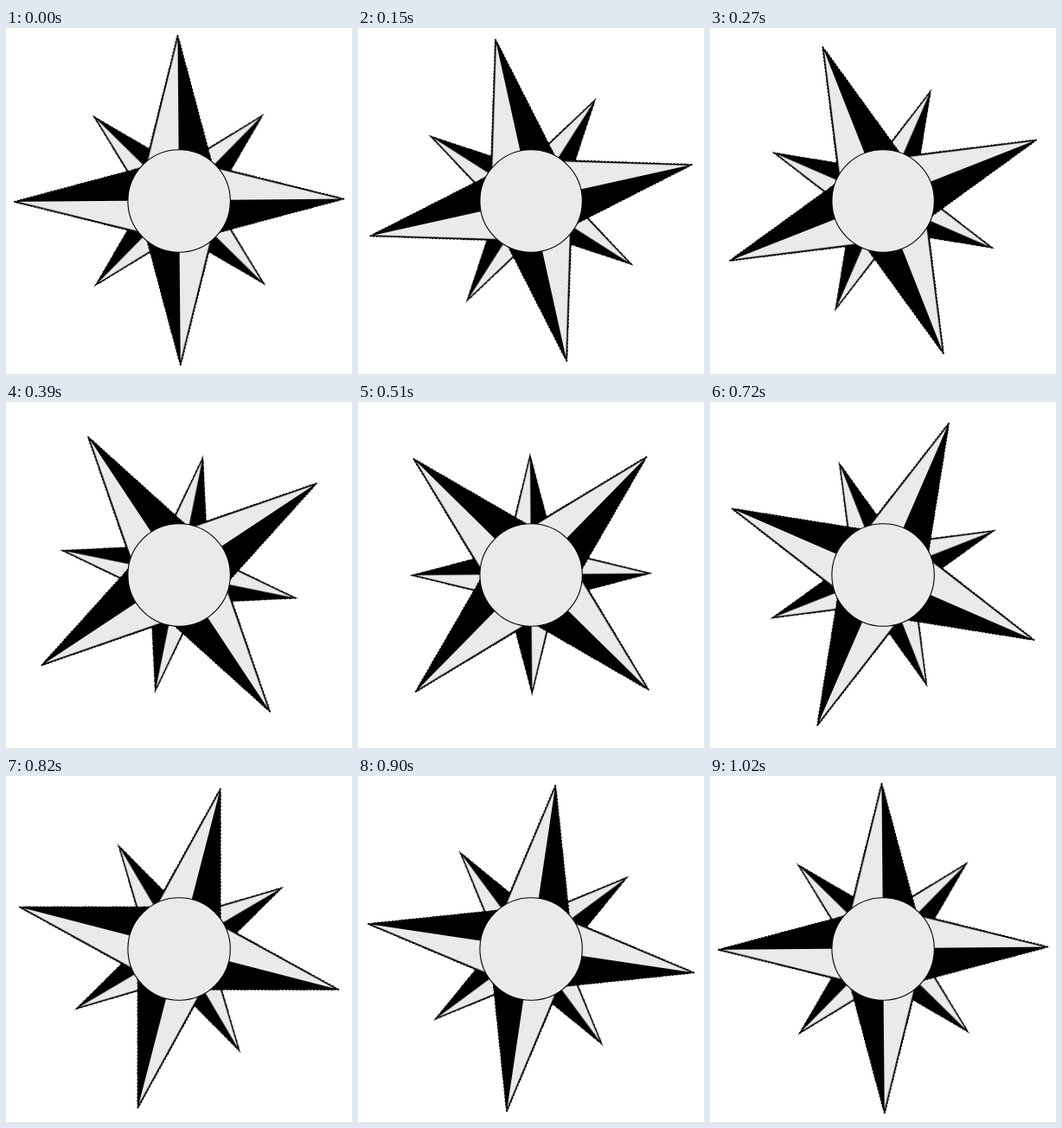
An HTML page that plays this animation: 400x400 px, repeating every 1620 ms.

```html
<!DOCTYPE html>
<html lang="en">
<head>
<meta charset="utf-8">
<title>Turning compass rose</title>
<style>
  html, body { margin: 0; width: 100%; height: 100%; overflow: hidden; background: #fff; }
  svg { display: block; width: 100vw; height: 100vh; }
  .dark { fill: #000; shape-rendering: crispEdges; }
  .light, .hub { fill: #e9ebe8; }
  .hub { stroke: #000; stroke-width: 1.1; }
  .rose { animation: turn 1620ms infinite; }

  /* 3 degrees per step: 30 ms, 6 x 40 ms, 17 x 30 ms, 6 x 40 ms, then rest */
  @keyframes turn {
    0%       { transform: rotate(-0.5deg);  animation-timing-function: steps(1); }
    1.8518%  { transform: rotate(-3.5deg);  animation-timing-function: steps(6); }
    16.6666% { transform: rotate(-21.5deg); animation-timing-function: steps(17); }
    48.1481% { transform: rotate(-72.5deg); animation-timing-function: steps(6); }
    62.9629%, 100% { transform: rotate(-90.5deg); }
  }
</style>
</head>
<body>
<svg viewBox="0 0 400 400">
  <defs>
    <g id="long">
      <path class="dark" d="M0-193.3L39.5-40L0 0L-39.5-40Z"/>
      <path class="light" d="M0-186L-37.2-40L0 0Z"/>
    </g>
    <g id="short">
      <path class="dark" d="M0-140L25.4-40L0 0L-25.4-40Z"/>
      <path class="light" d="M0-133.5L-23.3-40L0 0Z"/>
    </g>
  </defs>
  <g transform="translate(200.1 199.2)">
    <g class="rose">
      <use href="#short" transform="rotate(45)"/>
      <use href="#short" transform="rotate(135)"/>
      <use href="#short" transform="rotate(225)"/>
      <use href="#short" transform="rotate(315)"/>
      <use href="#long"/>
      <use href="#long" transform="rotate(90)"/>
      <use href="#long" transform="rotate(180)"/>
      <use href="#long" transform="rotate(270)"/>
    </g>
  </g>
  <circle class="hub" cx="200.1" cy="200" r="59.2"/>
</svg>
</body>
</html>
```
